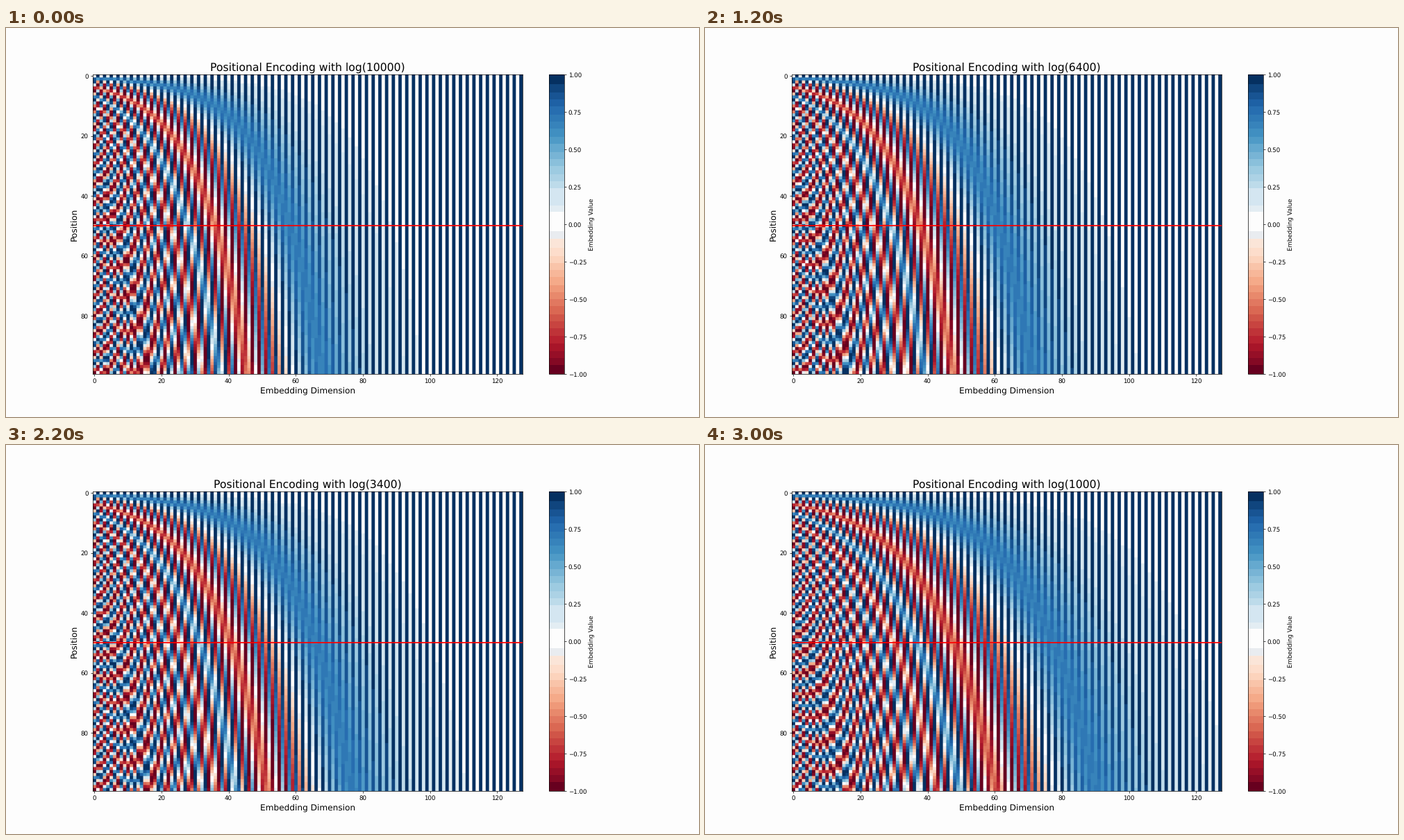
A matplotlib script that plays this animation: 998x561 px, repeating every 3100 ms.

```python
import numpy as np
import matplotlib.pyplot as plt
from matplotlib.animation import FuncAnimation
from matplotlib.cm import ScalarMappable
from matplotlib.colors import ListedColormap, Normalize, to_rgba

WIDTH, HEIGHT, DPI = 998, 561, 62.375
FRAMES, INTERVAL = 31, 100
POSITIONS, DIMS = 100, 128
BASE_START, BASE_STEP = 10000, 300
HIGHLIGHT = 50
OVERSAMPLE = 10
PAPER = "#fdfdfd"

plt.rcParams["font.family"] = "DejaVu Sans"
plt.rcParams["text.hinting"] = "none"


def stepped_cmap():
    """Red-to-blue map in flat bands, with a pale band around zero."""
    edges = np.concatenate([
        np.linspace(-0.945, -0.16, 17),
        [-0.095, -0.05, 0.087, 0.127],
        np.linspace(0.24, 0.94, 15),
    ])
    bounds = np.concatenate([[-1], edges, [1]])
    centers = (bounds[:-1] + bounds[1:]) / 2
    centers[[0, -1]] = -1, 1
    bands = plt.get_cmap("RdBu")((centers + 1) / 2)
    zero = np.searchsorted(edges, 0)
    bands[zero] = to_rgba(PAPER)
    bands[zero - 1] = to_rgba("#e9ecf0")
    return ListedColormap(bands[np.digitize(np.linspace(-1, 1, 256), edges)])


def encoding(base):
    position = np.arange(POSITIONS)[:, None]
    rate = np.exp(-np.log(base) * np.arange(0, DIMS, 2) / DIMS)
    table = np.empty((POSITIONS, DIMS))
    table[:, 0::2] = np.sin(position * rate)
    table[:, 1::2] = np.cos(position * rate)
    return table


cmap = stepped_cmap()
norm = Normalize(-1, 1)


def pixels(base):
    """Enlarged RGB cells, so that cell edges are smoothed when drawn."""
    rgb = cmap(norm(encoding(base)), bytes=True)[..., :3]
    return rgb.repeat(OVERSAMPLE, axis=0).repeat(OVERSAMPLE, axis=1)


fig, ax = plt.subplots(
    figsize=(WIDTH / DPI, (HEIGHT + 0.0001) / DPI), dpi=DPI, facecolor=PAPER)
image = ax.imshow(
    pixels(BASE_START), aspect="auto", interpolation="hanning",
    extent=(-0.5, DIMS - 0.5, POSITIONS - 0.5, -0.5))
ax.axhline(HIGHLIGHT, color="red", linewidth=2)
ax.set_xlabel("Embedding Dimension", fontsize=14)
ax.set_ylabel("Position", fontsize=14)
title = ax.set_title("", fontsize=18)
fig.colorbar(ScalarMappable(norm, cmap), ax=ax, label="Embedding Value",
             ticks=np.linspace(-1, 1, 9))


def update(i):
    base = BASE_START - BASE_STEP * i
    image.set_data(pixels(base))
    title.set_text(f"Positional Encoding with log({base})")
    return image, title


anim = FuncAnimation(fig, update, frames=FRAMES, interval=INTERVAL,
                     repeat=True, repeat_delay=0)
plt.show()
```
